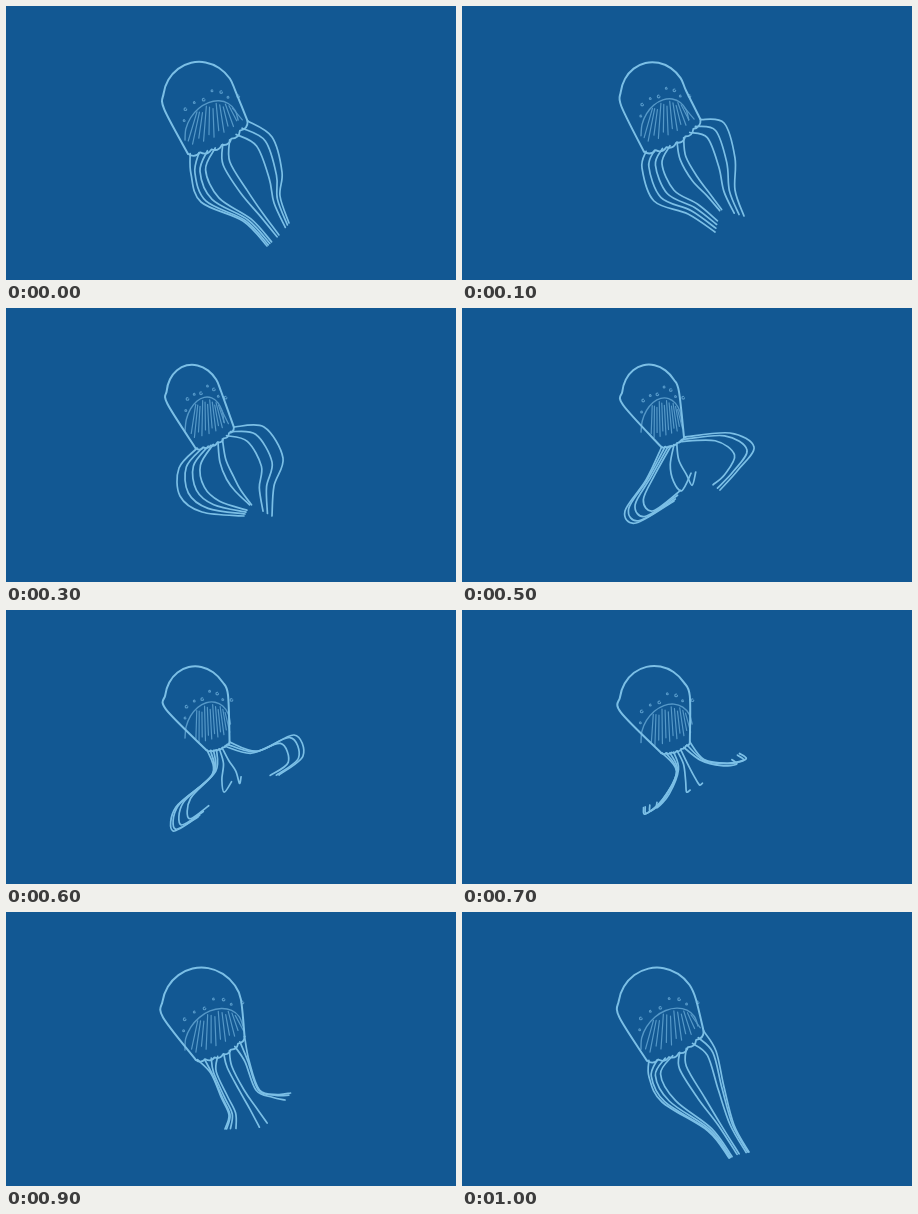
Recreate the animation shown at these times as an HTML page with a canvas. Size 450 by 274 pixels, loop 1100 ms.

```html
<!DOCTYPE html>
<html lang="en">
<head>
<meta charset="utf-8">
<title>Jellyfish</title>
<style>
  html, body { margin: 0; width: 100%; height: 100%; overflow: hidden; background: #125893; }
  canvas { display: block; width: 450px; height: 274px; }
</style>
</head>
<body>
<canvas id="sea"></canvas>
<script>
const LOOP = 1100, STEP = 100;
const LINE = '#7bbfe6', FAINT = '#5598c8', WATER = '#125893';

// Key paths of the stroke by step: leftmost arm, core of the bundle, rightmost arm.
const strokeKeys = {
  0: ['185,168 195,196 237,215 261,240', '220,158 238,186 256,210 272,230', '266,131 276,166 274,190 283,217'],
  1: ['180,162 192,195 226,208 253,226', '221,153 233,173 246,188 258,203', '262,117 273,152 273,184 282,210'],
  3: ['173,160 174,188 196,204 238,208', '217,154 224,170 232,182 244,196', '258,119 277,150 268,178 266,208'],
  5: ['184,172 163,203 174,215 212,193', '211,155 217,170 225,179 231,162', '268,125 292,139 276,162 258,182'],
  6: ['206,165 170,197 167,221 192,207', '219,152 222,166 225,177 230,167', '252,141 288,125 297,146 273,165'],
  8: ['223,158 231,182 200,187 171,188', '226,154 232,170 236,180 240,188', '232,158 245,181 271,152 282,122'],
  10: ['187,165 200,190 246,219 267,246', '221,156 240,186 257,212 276,242', '254,139 262,175 272,213 287,240']
};

// How far each arm lies from the outer arm of its side towards the core
const LEFT = [0, .16, .32, .48, .93], RIGHT = [.93, .4, .2, 0];

const parse = s => s.split(' ').map(p => p.split(',').map(Number));
const mix = (a, b, t) => [a[0] + (b[0] - a[0]) * t, a[1] + (b[1] - a[1]) * t];
const mixAll = (a, b, t) => a.map((p, i) => mix(p, b[i], t));

for (const step in strokeKeys) strokeKeys[step] = strokeKeys[step].map(parse);

function strokeAt(step) {
  if (strokeKeys[step]) return strokeKeys[step];
  const next = strokeKeys[step + 1];
  return strokeKeys[step - 1].map((path, i) => mixAll(path, next[i], .5));
}

// Half an ellipse standing on the line from centre - side to centre + side
function arch(centre, side, up) {
  return Array.from({ length: 9 }, (_, i) => {
    const c = Math.cos(Math.PI * i / 8), s = Math.sin(Math.PI * i / 8);
    return [0, 1].map(k => centre[k] - side[k] * c + up[k] * s);
  });
}

// The body swells and contracts once per loop.
function bodyAt(time) {
  const wave = (mean, size, peak) => mean + size * Math.cos(2 * Math.PI * (time - peak) / LOOP);
  const pulse = wave(0, 1, 920), tilt = .23;
  const left = [wave(191, 9.5, 600), wave(143.5, 5, 1000)];
  const right = [wave(232, 10, 1050), wave(123, 9.5, 650)];

  const rx = 33.5 + 6.5 * pulse, ry = 37 + 4 * pulse;
  const dome = arch([192 + 4 * pulse, 93 + 3.5 * pulse],
    [rx * Math.cos(tilt), -rx * Math.sin(tilt)],
    [-ry * Math.sin(tilt), -ry * Math.cos(tilt)]);

  const hoodLeft = [179, 130 + 8 * pulse], hoodRight = [227 + 10 * pulse, 114];
  const mid = mix(hoodLeft, hoodRight, .5);
  const hood = arch(mid,
    [hoodRight[0] - mid[0], hoodRight[1] - mid[1]],
    [201 + 3 * pulse - mid[0], 94 + 5 * pulse - mid[1]]);

  const rim = v => {
    const p = mix(left, right, v), sag = .5 * v * (1 - v);
    return [p[0] - (right[1] - left[1]) * sag, p[1] + (right[0] - left[0]) * sag];
  };
  return { bell: [left, ...dome, right], hood, rim, bunch: wave(1.4, .5, 750) };
}

function armsAt(step, { rim, bunch }) {
  const [left, core, right] = strokeAt(step);
  const arm = outer => k => mixAll(outer, core, k ** bunch);
  const arms = [...LEFT.map(arm(left)), ...RIGHT.map(arm(right))];
  return arms.map((path, i) => [rim(.03 + .97 * i / (arms.length - 1)), ...path]);
}

const canvas = document.getElementById('sea');
const ctx = canvas.getContext('2d');
const ratio = window.devicePixelRatio || 1;
canvas.width = 450 * ratio;
canvas.height = 274 * ratio;
ctx.scale(ratio, ratio);
ctx.lineCap = ctx.lineJoin = 'round';

function stroke(color, width) {
  ctx.strokeStyle = color;
  ctx.lineWidth = width;
  ctx.stroke();
}

// Smooth curve through all points
function curve(pts, color, width) {
  ctx.beginPath();
  ctx.moveTo(...pts[0]);
  for (let i = 0; i < pts.length - 1; i++) {
    const p = pts[i], q = pts[i + 1];
    const before = pts[i - 1] || p, after = pts[i + 2] || q;
    ctx.bezierCurveTo(
      p[0] + (q[0] - before[0]) / 6, p[1] + (q[1] - before[1]) / 6,
      q[0] - (after[0] - p[0]) / 6, q[1] - (after[1] - p[1]) / 6, ...q);
  }
  stroke(color, width);
}

function scallops(rim, count) {
  ctx.beginPath();
  ctx.moveTo(...rim(0));
  for (let i = 1; i <= count; i++) {
    const p = rim((i - 1) / count), q = rim(i / count), m = mix(p, q, .5);
    ctx.quadraticCurveTo(m[0] - (q[1] - p[1]) * .45, m[1] + (q[0] - p[0]) * .45, ...q);
  }
  stroke(LINE, 1.8);
}

// Point at fraction u along a list of points
function along(pts, u) {
  const x = u * (pts.length - 1), i = Math.min(Math.floor(x), pts.length - 2);
  return mix(pts[i], pts[i + 1], x - i);
}

function rays(hood, rim) {
  for (let i = 0; i <= 11; i++) {
    const v = i / 11;
    const top = along(hood, .36 + .42 * v);
    const foot = mix(mix(hood[0], hood[8], v), rim(v), .5);
    ctx.beginPath();
    ctx.moveTo(...mix(top, foot, .06 + .06 * (i % 3)));
    ctx.lineTo(...mix(top, foot, .84 + .12 * (i % 2)));
    stroke(FAINT, 1.2);
  }
}

function spots(hood) {
  const mid = mix(hood[0], hood[8], .5);
  for (let i = 0; i < 8; i++) {
    const out = 1.2 + .1 * (i * 2 % 3);
    const [x, y] = mix(mid, along(hood, .2 + .085 * i), out);
    ctx.beginPath();
    ctx.arc(x, y, .9 + .4 * (i % 2), 0, 5);
    stroke(FAINT, 1.2);
  }
}

function draw(step) {
  const body = bodyAt(step * STEP);
  ctx.fillStyle = WATER;
  ctx.fillRect(0, 0, 450, 274);
  rays(body.hood, body.rim);
  curve(body.hood, FAINT, 1.4);
  spots(body.hood);
  armsAt(step, body).forEach(arm => curve(arm, LINE, 1.7));
  curve(body.bell, LINE, 2);
  scallops(body.rim, 6);
}

const start = performance.now();
function tick() {
  draw(Math.floor((performance.now() - start) % LOOP / STEP));
  requestAnimationFrame(tick);
}
tick();
</script>
</body>
</html>
```
